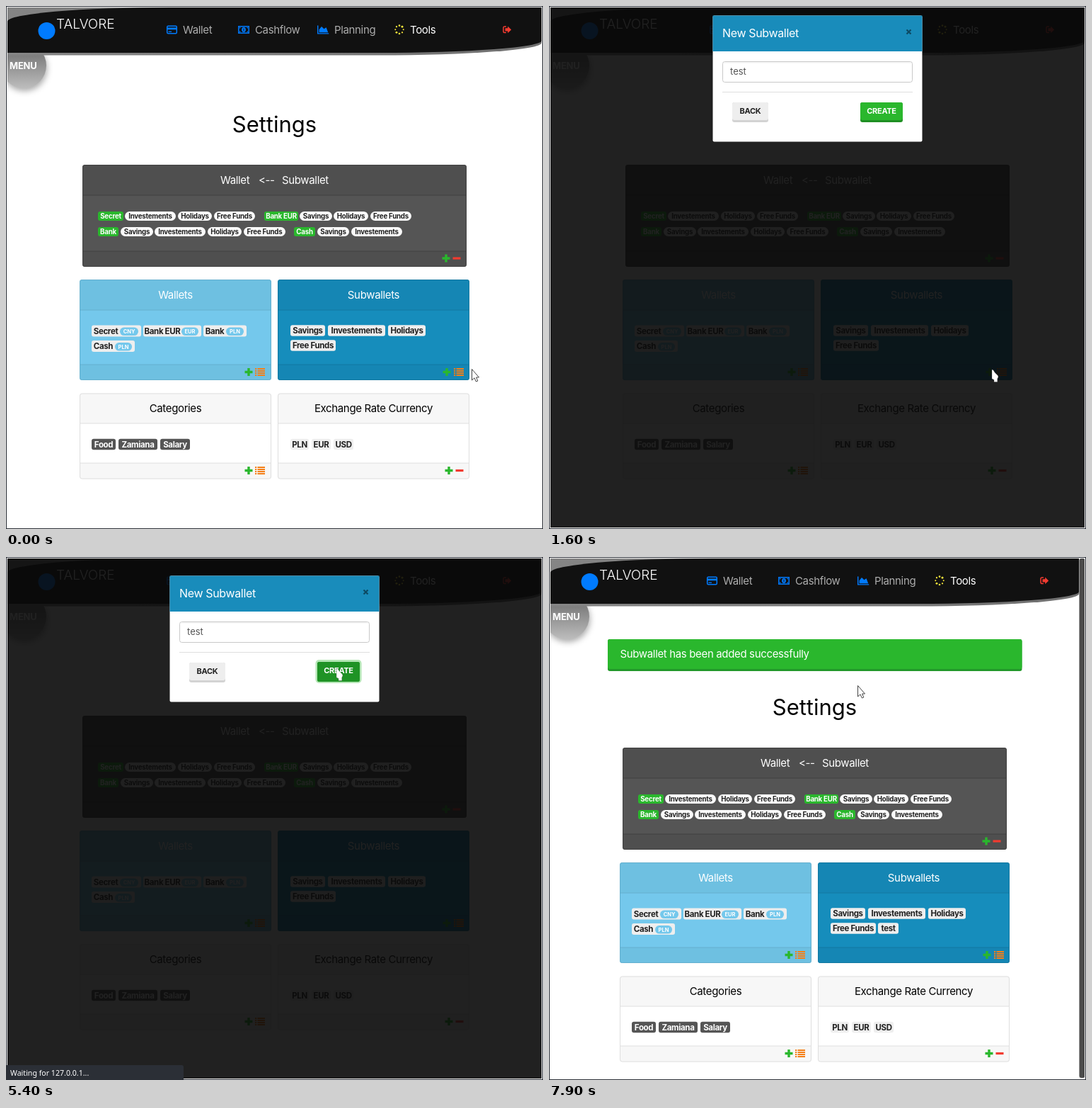
An HTML page that plays this animation: 759 px wide and 738 px high, repeating every 8 s.

```html
<!DOCTYPE html>
<html lang="en">
<head>
<meta charset="utf-8">
<title>Wallet settings</title>
<style>
  html, body { margin: 0; width: 100%; height: 100%; overflow: hidden; background: #fff; }
  svg { display: block; width: 100vw; height: 100vh; }
  text { font: 15px Inter, "Open Sans", sans-serif; letter-spacing: -.35px; }
  .mid { text-anchor: middle; }
  .h1 { font-size: 31px; letter-spacing: 0; }
  .brand { font-size: 19px; font-weight: 300; letter-spacing: 0; }
  .menu { font-size: 13px; font-weight: 700; letter-spacing: -.2px; }
  .tag { font-size: 11.5px; font-weight: 700; }
  .mini { font-size: 9.75px; font-weight: 700; letter-spacing: -.25px; }
  .code { font-size: 7.5px; font-weight: 700; letter-spacing: 0; }
  .btn { font-size: 11px; font-weight: 700; letter-spacing: -.3px; }
  .title { font-size: 16px; }
  .field { font-size: 13px; letter-spacing: 0; }
  .status { font: 10.6px "Noto Sans", sans-serif; letter-spacing: 0; }
</style>
</head>
<body>
<svg id="stage" viewBox="0 0 759 738" preserveAspectRatio="none"></svg>
<script>
const GREEN = '#2ab72d', RED = '#f23b30', ORANGE = '#f57f17', BLUE = '#007bff';
const INK = '#212121', LIGHT = '#eeeeee', DARK = '#555555', SKY = '#74c8ec', SEA = '#168dbc';

const rect = (x, y, w, h, fill, more = '') =>
  `<rect x="${x}" y="${y}" width="${w}" height="${h}" fill="${fill}" ${more}/>`;
const path = (d, fill, more = '') => `<path d="${d}" fill="${fill}" ${more}/>`;
const text = (x, y, s, fill, cls = '') =>
  `<text x="${x}" y="${y}" fill="${fill}" class="${cls}">${s}</text>`;
const group = (id, body, more = '') => `<g id="${id}" ${more}>${body}</g>`;

// Label on a rounded box from x1 to x2, centred on cy
function pill(x1, x2, cy, s, fill, ink, cls = 'tag', h = 15.5, r = 3) {
  const drop = { tag: 4, mini: 3.5, code: 2.7 }[cls];
  return rect(x1, cy - h / 2, x2 - x1, h, fill, `rx="${r}"`) +
    text((x1 + x2) / 2, cy + drop, s, ink, cls + ' mid');
}
const ownerRow = (cy, items) => items.map(([s, a, b, owner]) =>
  pill(a, b, cy, s, owner ? GREEN : '#fafafa', owner ? '#fff' : INK, 'mini', 13, owner ? 3 : 6.5)).join('');
const tagRow = (cy, items, fill = LIGHT, ink = INK) =>
  items.map(([s, a, b]) => pill(a, b, cy, s, fill, ink)).join('');

function walletTag(x1, x2, cy, s, code, c1) {
  return rect(x1, cy - 8, x2 - x1, 16, LIGHT, 'rx="3"') +
    text((x1 + c1) / 2, cy + 4, s, INK, 'tag mid') +
    pill(c1, x2 - 4, cy + .8, code, SKY, '#fff', 'code', 11.5, 5.7);
}

function card(x, y, w, h, head, foot, cap, body, line) {
  const edge = `stroke="${line}" stroke-width="1"`;
  return rect(x, y, w, h, cap, 'rx="3.5"') + rect(x, head, w, foot - head, body) +
    path(`M${x} ${head}h${w}M${x} ${foot}h${w}`, 'none', edge) +
    rect(x + .5, y + .5, w - 1, h - 1, 'none', `rx="3" ${edge}`);
}

const plus = (x, y) => path(`M${x - 5.5} ${y}h11M${x} ${y - 5.5}v11`, 'none', `stroke="${GREEN}" stroke-width="3.4"`);
const minus = (x, y) => path(`M${x - 5.5} ${y}h11`, 'none', `stroke="${RED}" stroke-width="3.2"`);
function list(x, y) {
  let d = '';
  for (let i = 0; i < 4; i++) d += `M${x - 7} ${y - 4.5 + i * 3}h2.2m1.3 0h10.5`;
  return path(d, 'none', `stroke="${ORANGE}" stroke-width="1.9"`);
}

function spinner(cx, cy) {
  let s = '';
  for (let i = 0; i < 8; i++) {
    const a = i * Math.PI / 4;
    s += `<circle cx="${cx + 5.7 * Math.cos(a)}" cy="${cy + 5.7 * Math.sin(a)}" r="${1 + (i % 4) * .15}" fill="#ffeb3b"/>`;
  }
  return s;
}

const navItems =
  rect(227.7, 28.2, 13.6, 10.6, 'none', `rx="1.5" stroke="${BLUE}" stroke-width="1.5"`) +
  rect(227.5, 30.5, 14, 2.8, BLUE) + rect(229.5, 35.6, 4.5, 1.3, BLUE) +
  text(250, 38.5, 'Wallet', '#adadad') +
  rect(328.8, 28.8, 14.4, 9.4, 'none', `stroke="${BLUE}" stroke-width="1.5"`) +
  `<ellipse cx="336" cy="33.5" rx="2.8" ry="3.4" fill="${BLUE}"/>` + rect(335.5, 31.6, 1, 3.8, '#111') +
  path('M330 30h2l-2 2zM342 30h-2l2 2zM330 37h2l-2-2zM342 37h-2l2-2z', BLUE) +
  text(352, 38.5, 'Cashflow', '#adadad') +
  path('M440 27.5h1.4v10.8h14.8v1.3h-16.2zM442.6 37.2v-4l3.4-4.2 3.4 3.2 3.2-2 2.6 7z', BLUE) +
  text(464, 38.5, 'Planning', '#adadad') +
  spinner(556, 33.3) + text(571, 38.5, 'Tools', '#fff');

const exitIcon =
  path('M707 29h-2.2q-1.8 0-1.8 1.8v5q0 1.8 1.8 1.8h2.2', 'none', `stroke="${RED}" stroke-width="1.5"`) +
  path('M705.5 31.3h3.7v-2.8l5 4.9-5 4.9v-2.9h-3.7z', RED);

const cards =
  text(379.5, 178, 'Settings', '#000', 'h1 mid') +
  card(108, 224, 543, 144, 267, 346, '#4f4f4f', DARK, '#404040') +
  text(303, 250.5, 'Wallet', '#fff') + text(357, 250.5, '&lt;--', '#fff') + text(390, 250.5, 'Subwallet', '#fff') +
  ownerRow(296.5, [['Secret', 130, 166, 1], ['Investements', 168, 240], ['Holidays', 243, 291],
    ['Free Funds', 294, 352], ['Bank EUR', 365, 413, 1], ['Savings', 415, 461],
    ['Holidays', 463, 512], ['Free Funds', 515, 573]]) +
  ownerRow(318.5, [['Bank', 130, 159, 1], ['Savings', 162, 208], ['Investements', 210, 282],
    ['Holidays', 285, 333], ['Free Funds', 336, 395], ['Cash', 407, 437, 1],
    ['Savings', 440, 485], ['Investements', 488, 560]]) +
  plus(622, 356) + minus(637, 356) +

  card(104, 386, 271, 142, 429, 506, '#6ec0e1', SKY, '#64afce') +
  text(239.5, 412.5, 'Wallets', '#fff', 'mid') +
  walletTag(121, 191, 458.5, 'Secret', 'CNY', 161) + walletTag(194, 276, 458.5, 'Bank EUR', 'EUR', 248) +
  walletTag(279, 340, 458.5, 'Bank', 'PLN', 311) + walletTag(121, 182, 480, 'Cash', 'PLN', 154) +
  plus(343, 516.5) + list(359, 516.5) +

  card(384, 386, 271, 142, 429, 506, '#1586b4', SEA, '#1278a1') +
  text(519.5, 412.5, 'Subwallets', '#fff', 'mid') +
  tagRow(458, [['Savings', 402, 451], ['Investements', 455, 536], ['Holidays', 540, 593]]) +
  tagRow(479, [['Free Funds', 402, 466]]) + group('added', tagRow(479, [['test', 469, 498]])) +
  plus(623, 516.5) + list(640, 516.5) +

  card(104, 546.5, 271, 121, 589, 645, '#f7f7f7', '#fff', '#dfdfdf') +
  text(239.5, 573, 'Categories', '#000', 'mid') +
  tagRow(618.5, [['Food', 121, 155], ['Zamiana', 159, 214], ['Salary', 218, 260]], DARK, '#fff') +
  plus(343, 655.5) + list(359, 655.5) +

  card(384, 546.5, 271, 121, 589, 645, '#f7f7f7', '#fff', '#dfdfdf') +
  text(519.5, 573, 'Exchange Rate Currency', '#000', 'mid') +
  tagRow(618.5, [['PLN', 402, 428], ['EUR', 432, 459], ['USD', 463, 491]]) +
  plus(626, 655.5) + minus(641, 655.5);

const alertBox =
  rect(87, 116, 585.5, 45, '#22982a', 'rx="3"') + rect(87, 116, 585.5, 42, GREEN, 'rx="3"') +
  text(104.5, 142, 'Subwallet has been added successfully', '#fff');

const modal =
  rect(231.5, 26.5, 296, 178, '#fff', 'rx="2"') + rect(231.5, 26.5, 296, 50.5, '#198cbb') +
  text(245, 57, 'New Subwallet', '#fff', 'title') +
  path('M505.5 46.5l6 6m0-6l-6 6', 'none', 'stroke="#0d4a63" stroke-width="2.2"') +
  rect(245.5, 91.5, 268, 29, '#fff', 'rx="3" stroke="#c8c8c8"') +
  path('M247 93h265', 'none', 'stroke="#eee"') +
  text(256, 110, 'test', '#555', 'field') +
  path('M245 134.5h269', 'none', 'stroke="#dedede"') +
  rect(259, 149, 51, 28, '#d3d3d3', 'rx="3"') + rect(259, 149, 51, 25, LIGHT, 'rx="3"') +
  text(284.5, 165, 'BACK', INK, 'btn mid') +
  group('glow', rect(437.5, 145, 65, 33, '#b4e6b5', 'rx="5"')) +
  group('create', rect(440, 149, 60, 28, '#1f8f23', 'rx="3"') +
    `<rect id="face" x="440" y="149" width="60" height="25" rx="3"/>` +
    text(470, 165, 'CREATE', '#fff', 'btn mid'));

const wideBar =
  rect(745, 2, 12, 735, '#f1f1f1') + rect(746.5, 14, 9.5, 710, '#c1c1c1') +
  path('M748 10h6l-3-3.5zM748 729h6l-3 3.5z', '#555');
const thinBar = rect(749, 2, 8, 735, '#eee') + rect(749.5, 2, 8, 733, '#4b4b4b', 'rx="3"');

const arrow = path('M.5 .5V16L4 12.8 6.4 18 8.8 17 6.6 12H10.5z', '#fff', 'stroke="#444" stroke-width="1"');
const hand = path('M0 0L2 .8 4 4 8.5 8.5 9 10.5 7.8 13V17.5H3V14.5L0 13z', '#fff', 'stroke="#333" stroke-opacity=".5" stroke-width=".6"');
const beam = path('M-3 -7.5h2.2l.8 .8 .8-.8H3M0-7V7M-3 7.5h2.2l.8-.8 .8 .8H3', 'none', 'stroke="#222" stroke-width="1.2"');

document.getElementById('stage').innerHTML =
  `<defs>
   <linearGradient id="disc" x2="0" y2="1"><stop offset=".2" stop-color="#777"/><stop offset="1" stop-color="#bdbdbd"/></linearGradient>
   <linearGradient id="trim"><stop stop-color="#858585"/><stop offset="1" stop-color="#707070"/></linearGradient></defs>` +
  rect(0, 0, 759, 738, '#fff') +
  `<circle cx="25" cy="84" r="32" fill="url(#disc)" style="filter:drop-shadow(1px 4px 4px #0005)"/>` +
  text(5, 89, 'MENU', '#fff', 'menu') +
  `<path id="trimBand" fill="url(#trim)"/><path id="navBand" fill="#111"/>` +
  `<circle cx="57.5" cy="35" r="12" fill="${BLUE}"/>` + text(71, 32, 'TALVORE', '#fff', 'brand') +
  group('nav', navItems) + group('exit', exitIcon) + group('cards', cards) + group('alert', alertBox) +
  group('shade', rect(0, 0, 759, 738, '#090909', 'fill-opacity=".9"')) +
  group('modal', modal) + group('wideBar', wideBar) + group('thinBar', thinBar) +
  rect(1.5, 1.5, 756, 735, 'none', 'stroke="#fff"') + rect(.5, .5, 758, 737, 'none', 'stroke="#2a2e36"') +
  group('status', path('M0 717H248q3 0 3 3V738H0z', '#2b2f36') + text(6, 731.5, 'Waiting for 127.0.0.1...', '#fff', 'status')) +
  group('pointer', group('arrow', arrow) + group('hand', hand) + group('beam', beam));

const el = {};
document.querySelectorAll('[id]').forEach(n => el[n.id] = n);
const show = (n, on) => n.setAttribute('display', on ? 'inline' : 'none');
const move = (n, x, y) => n.setAttribute('transform', `translate(${x} ${y})`);
const clamp = v => Math.max(0, Math.min(1, v));

// time, x, y of the pointer
const route = [[0, 658, 512], [100, 645, 512], [200, 637, 512], [400, 637, 512], [600, 626, 513],
  [1600, 626, 513], [2300, 394, 112], [3000, 394, 112], [3300, 249, 112], [3400, 249, 112],
  [4300, 468, 160], [4400, 467, 157], [6000, 467, 157], [6100, 466, 155], [6600, 466, 155],
  [7000, 472, 140], [7100, 472, 140], [7600, 437, 177], [7700, 437, 177], [7900, 436, 181], [8000, 436, 181]];

function pointerAt(t) {
  const i = route.findIndex(k => k[0] > t);
  const [a, b] = [route[i - 1], route[i]];
  const p = (t - a[0]) / (b[0] - a[0]);
  return [a[1] + (b[1] - a[1]) * p, a[2] + (b[2] - a[2]) * p];
}

function draw(time) {
  const t = Math.floor(time / 100) * 100;
  const saved = t >= 6100, open = t >= 1500 && !saved;
  const dx = !saved ? 0 : t < 6400 ? -6 : -4;
  const right = 757 + 2 * dx;

  el.trimBand.setAttribute('d', `M2 2H${right}V52A230 17.5 0 0 1 ${right - 230} 69.5H2z`);
  el.navBand.setAttribute('d', `M2 22A230 20 0 0 1 232 2H${right}V49A230 17 0 0 1 ${right - 230} 66H2z`);
  move(el.nav, dx, 0);
  move(el.exit, 2 * dx, 0);
  move(el.cards, dx, saved ? 45 : 0);
  move(el.alert, dx, 0);
  show(el.alert, saved);
  show(el.added, saved);
  show(el.wideBar, saved && t < 6400);
  show(el.thinBar, t >= 6400);
  show(el.status, t >= 5400 && t < 6800);

  const alpha = clamp((t - 1450) / 150);
  const drop = Math.round(-50 * (1 - clamp((t - 1414) / 300)) ** 1.4);
  show(el.shade, open);
  show(el.modal, open);
  el.shade.setAttribute('opacity', alpha);
  el.modal.setAttribute('opacity', alpha);
  move(el.modal, 0, drop);

  const hover = t >= 4200, pressed = t >= 4700;
  el.face.setAttribute('fill', pressed ? '#1f9325' : hover ? '#26a529' : GREEN);
  el.face.setAttribute('height', pressed ? 28 : 25);
  move(el.create, 0, pressed ? -1 : 0);
  show(el.glow, t >= 5400);

  const [x, y] = pointerAt(t);
  const isHand = (t >= 200 && t < 1700) || (hover && !saved);
  const isBeam = open && t >= 2200 && y < 121;
  move(el.pointer, x, y);
  show(el.hand, isHand);
  show(el.beam, isBeam);
  show(el.arrow, !isHand && !isBeam);
}

const start = performance.now();
function tick() {
  draw((performance.now() - start) % 8000);
  requestAnimationFrame(tick);
}
tick();
</script>
</body>
</html>
```
